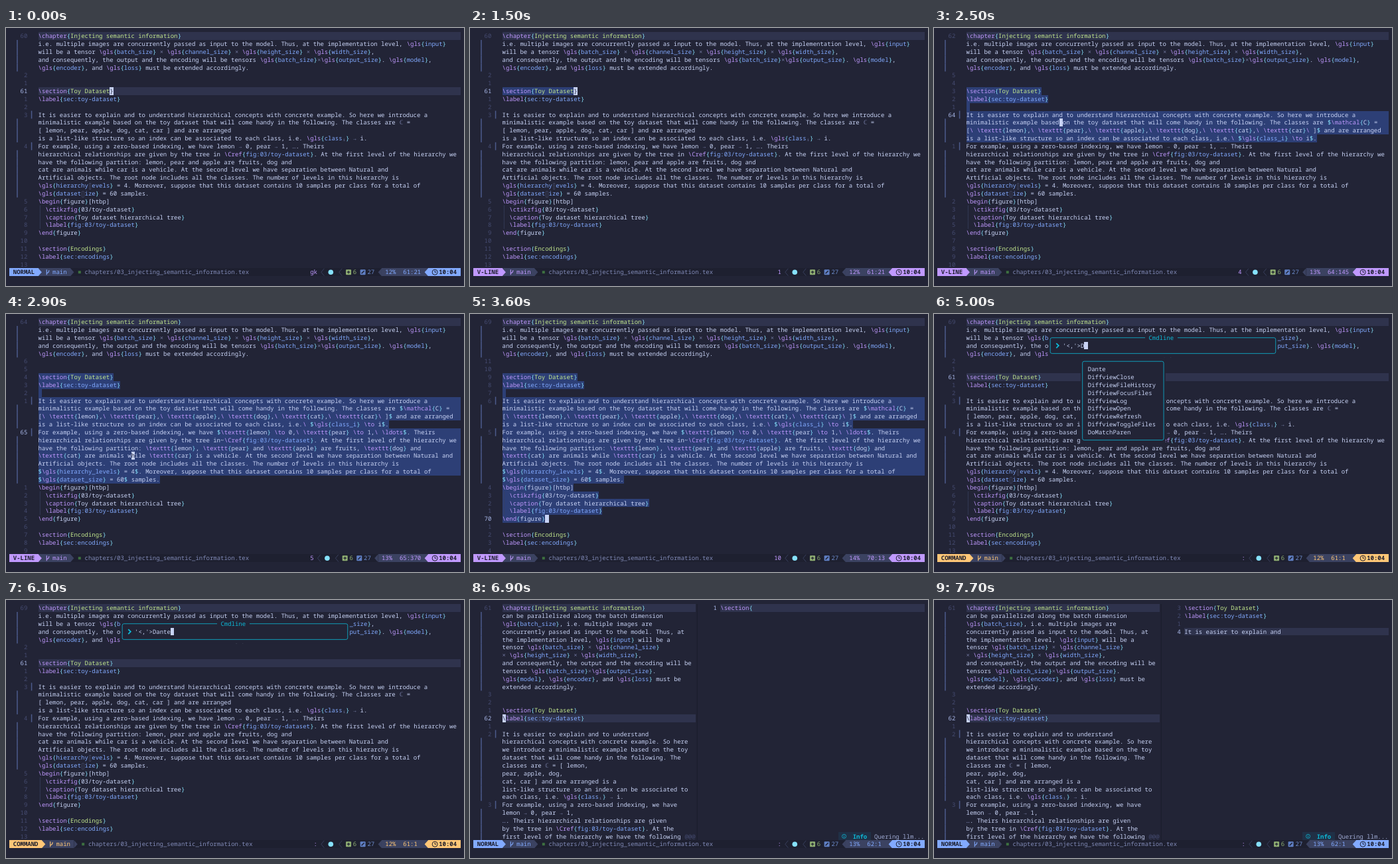
Animation, 690 px wide and 388 px high, one loop 8 s. Source, as an HTML page:

```html
<!DOCTYPE html>
<html lang="en">
<head>
<meta charset="utf-8">
<title>Editor session</title>
<style>
  html, body { margin: 0; width: 100%; height: 100%; overflow: hidden; background: #222436; }
  svg { display: block; width: 690px; height: 388px; }
  text {
    font: 8.983px "Noto Sans Mono", "DejaVu Sans Mono", monospace;
    white-space: pre;
    text-rendering: geometricPrecision;
    font-variant-ligatures: none;
  }
  .b { font-weight: 700; }
</style>
</head>
<body>
<svg id="screen" viewBox="0 0 690 388"></svg>
<script>
const W = 5.39, H = 11.84, TOP = 6.1, LOOP = 8000, TEXT = 9, EDGE = 684.5;
const C = {
  bg: '#222436', bar: '#1e2030', line: '#2f334d', panel: '#3b4261', visual: '#2d3f76',
  fg: '#c8d3f5', dim: '#737aa2', num: '#454b70', cur: '#a9b8e8', sign: '#4d5b8c',
  purple: '#c099ff', blue: '#82aaff', cyan: '#86e1fc', green: '#c3e88d',
  yellow: '#ffc777', info: '#0db9d7', file: '#828bb8'
};

const wide = String.raw`\chapter{Injecting semantic information}
i.e. multiple images are concurrently passed as input to the model. Thus, at the implementation level, \gls{input}
will be a tensor \gls{batch_size} × \gls{channel_size} × \gls{height_size} × \gls{width_size},
and consequently, the output and the encoding will be tensors \gls{batch_size}×\gls{output_size}. \gls{model},
\gls{encoder}, and \gls{loss} must be extended accordingly.


\section{Toy Dataset}
\label{sec:toy-dataset}

It is easier to explain and to understand hierarchical concepts with concrete example. So here we introduce a
minimalistic example based on the toy dataset that will come handy in the following. The classes are ℂ =
[ lemon, pear, apple, dog, cat, car ] and are arranged
is a list-like structure so an index can be associated to each class, i.e. \gls{classᵢ} → i.
For example, using a zero-based indexing, we have lemon → 0, pear → 1, …. Theirs
hierarchical relationships are given by the tree in \Cref{fig:03/toy-dataset}. At the first level of the hierarchy we
have the following partition: lemon, pear and apple are fruits, dog and
cat are animals while car is a vehicle. At the second level we have separation between Natural and
Artificial objects. The root node includes all the classes. The number of levels in this hierarchy is
\gls{hierarchy▯evels} = 4. Moreover, suppose that this dataset contains 10 samples per class for a total of
\gls{dataset▯ize} = 60 samples.
\begin{figure}[htbp]
  \ctikzfig{03/toy-dataset}
  \caption{Toy dataset hierarchical tree}
  \label{fig:03/toy-dataset}
\end{figure}

\section{Encodings}
\label{sec:encodings}
`.split('\n');

// Unconcealed text of rows 11 to 20
const raw = String.raw`minimalistic example based on the toy dataset that will come handy in the following. The classes are $\mathcal{C} =
[\ \texttt{lemon},\ \texttt{pear},\ \texttt{apple},\ \texttt{dog},\ \texttt{cat},\ \texttt{car}\ ]$ and are arranged
is a list-like structure so an index can be associated to each class, i.e.\ $\gls{class_i} \to i$.
For example, using a zero-based indexing, we have $\texttt{lemon} \to 0,\ \texttt{pear} \to 1,\ \ldots$. Theirs
hierarchical relationships are given by the tree in~\Cref{fig:03/toy-dataset}. At the first level of the hierarchy we
have the following partition: \texttt{lemon}, \texttt{pear} and \texttt{apple} are fruits, \texttt{dog} and
\texttt{cat} are animals while \texttt{car} is a vehicle. At the second level we have separation between Natural and
Artificial objects. The root node includes all the classes. The number of levels in this hierarchy is
$\gls{hierarchy_levels} = 4$. Moreover, suppose that this dataset contains 10 samples per class for a total of
$\gls{dataset_size} = 60$ samples.`.split('\n');

const narrow = String.raw`\chapter{Injecting semantic information}
can be parallelized along the batch dimension
\gls{batch_size}, i.e. multiple images are
concurrently passed as input to the model. Thus, at
the implementation level, \gls{input} will be a
tensor \gls{batch_size} × \gls{channel_size}
× \gls{height_size} × \gls{width_size},
and consequently, the output and the encoding will be
tensors \gls{batch_size}×\gls{output_size}.
\gls{model}, \gls{encoder}, and \gls{loss} must be
extended accordingly.


\section{Toy Dataset}
\label{sec:toy-dataset}

It is easier to explain and to understand
hierarchical concepts with concrete example. So here
we introduce a minimalistic example based on the toy
dataset that will come handy in the following. The
classes are ℂ = [ lemon,
pear, apple, dog,
cat, car ] and are arranged is a
list-like structure so an index can be associated to
each class, i.e. \gls{classᵢ} → i.
For example, using a zero-based indexing, we have
lemon → 0, pear → 1,
…. Theirs hierarchical relationships are given
by the tree in \Cref{fig:03/toy-dataset}. At the
first level of the hierarchy we have the following`.split('\n');

// Buffer line number for a row; 0 where a line wraps
const wideLine = r => r < 5 ? 0 : r < 11 ? r + 54 : r === 14 ? 65 : r > 20 ? r + 45 : 0;
const narrowLine = r => r < 11 ? 0 : r < 17 ? r + 48 : r === 25 ? 65 : 0;
const lastRow = n => n < 64 ? n - 54 : n === 64 ? 13 : n === 65 ? 20 : n - 45;

// time, line, row, column, position, header number
const moves = [
  [1400, 61, 7, 20, '61:21', 60], [2300, 62, 8, 20, '62:21', 60], [2400, 63, 9, 0, '63:1', 61],
  [2500, 64, 11, 26, '64:145', 62], [2600, 64, 12, 26, '64:260', 63], [2700, 65, 14, 26, '65:27', 63],
  [2800, 65, 16, 26, '65:260', 64], [2900, 65, 17, 26, '65:370', 64], [3000, 65, 19, 26, '65:590', 64],
  [3100, 66, 21, 20, '66:21', 65], [3300, 67, 22, 20, '67:21', 66], [3400, 68, 23, 20, '68:21', 67],
  [3500, 69, 24, 20, '69:21', 68], [3600, 70, 25, 12, '70:13', 69]
];
const typed = [[4000, ''], [4100, "'<,'>"], [4900, "'<,'>D"], [5400, "'<,'>Dant"], [5700, "'<,'>Dante"]];
const streamed = [
  [6200, ''], [6900, '\\section{'], [7100, '\\section{Toy Dataset}'],
  [7200, '\\section{Toy Dataset}\n\\label{sec:'],
  [7400, '\\section{Toy Dataset}\n\\label{sec:toy-dataset}\n'],
  [7500, '\\section{Toy Dataset}\n\\label{sec:toy-dataset}\n\nIt is'],
  [7600, '\\section{Toy Dataset}\n\\label{sec:toy-dataset}\n\nIt is easier to'],
  [7700, '\\section{Toy Dataset}\n\\label{sec:toy-dataset}\n\nIt is easier to explain and']
];
const matches = ['Dante', 'DiffviewClose', 'DiffviewFileHistory', 'DiffviewFocusFiles', 'DiffviewLog',
  'DiffviewOpen', 'DiffviewRefresh', 'DiffviewToggleFiles', 'DoMatchParen'];
const at = (list, t) => list.filter(e => e[0] <= t).pop();

let out = '';
const X = c => c * W, Y = r => TOP + r * H;
const esc = s => s.replace(/&/g, '&amp;').replace(/</g, '&lt;').replace(/>/g, '&gt;');

function put(c, r, s, color = C.fg, cls = '') {
  if (s.trim()) out += `<text x="${X(c).toFixed(2)}" y="${(Y(r) + 9.1).toFixed(2)}" fill="${color}" class="${cls}">${esc(s)}</text>`;
}
function rect(x, y, w, h, color, more = '') {
  out += `<rect x="${x}" y="${y}" width="${w}" height="${h}" fill="${color}" ${more}/>`;
}
function fill(x1, x2, r, color) {
  rect(x1, Y(r), x2 - x1, H, color, 'shape-rendering="crispEdges"');
}
function path(d, color, width = 1, inside = 'none') {
  out += `<path d="${d}" fill="${inside}" stroke="${color}" stroke-width="${width}"/>`;
}
function cursor(c, r, ch = '') {
  fill(X(c), X(c + 1), r, C.fg);
  put(c, r, ch, C.bg);
}
function frame(c1, r1, c2, r2) {
  const x = X(c1 + .5), y = Y(r1 + .5);
  rect(X(c1), Y(r1), X(c2 + 1 - c1), (r2 - r1 + 1) * H, C.bg);
  rect(x, y, X(c2 - c1), (r2 - r1) * H, 'none', `rx="2.5" stroke="${C.info}" stroke-width=".8"`);
}

// TeX highlighting, one positioned run per token
function tex(c, r, s) {
  let arg = C.fg, next = C.fg, m;
  const re = /\\[a-zA-Z]+|\\ |[{}$]|[^\x00-\x7f]|[^\\{}$\u0080-\uffff]+/g;
  while (m = re.exec(s)) {
    const k = m[0];
    let color = arg;
    if (k[0] === '\\') {
      color = C.purple;
      next = /section|chapter/.test(k) ? C.green : /label|gls|Cref/.test(k) ? C.blue : C.fg;
    } else if (k === '{') { color = C.cyan; arg = next; }
    else if (k === '}') { color = C.cyan; arg = C.fg; }
    else if (k === '$') color = C.cyan;
    else if (k > '\x7f') color = C.dim;
    put(c + m.index, r, k, color);
  }
}

function gutter(lineOf, cur, rows) {
  for (let r = 1; r < 30; r++) {
    const n = lineOf(r);
    if (n) {
      const s = String(n === cur ? n : Math.abs(n - cur));
      put(6 - s.length, r, s, n === cur ? C.cur : C.num);
    }
    if (rows.bars.some(([a, b]) => r >= a && r <= b)) rect(16.2, Y(r), 1.5, H + .1, C.sign);
    if (rows.marks.includes(r)) rect(37.8, Y(r), 1.5, H, C.sign);
  }
}

function arrow(c, color, dir) {
  const a = X(dir > 0 ? c : c + 1), b = X(dir > 0 ? c + 1 : c), y = Y(30);
  out += `<path d="M${a} ${y}L${b} ${y + H / 2}L${a} ${y + H}Z" fill="${color}"/>`;
}

function status(s) {
  const r = 30, y = Y(r), mid = y + H / 2;
  fill(5.4, EDGE, r, C.bar);
  // left sections
  const e = s.mode.length + 3;
  fill(X(e), X(e + 9), r, C.panel);
  fill(5.4, X(e), r, s.tint);
  arrow(e, s.tint, 1);
  arrow(e + 9, C.panel, 1);
  put(2, r, s.mode, '#1b1d2b', 'b');
  const bx = X(e + 2) + 2;
  path(`M${bx} ${y + 2}V${y + 10}M${bx} ${y + 7.5}Q${bx + 3.5} ${y + 7} ${bx + 3.5} ${y + 3}`, s.tint, 1.1);
  put(e + 4, r, 'main', s.tint);
  rect(X(e + 11) + 1, mid - 2, 4, 4, '#3d7040');
  put(e + 13, r, 'chapters/03_injecting_semantic_information.tex', C.file);
  // right sections
  fill(X(118), EDGE, r, s.tint);
  const d = Math.max(0, s.pos.length - 5);
  fill(X(105 - d), X(118), r, C.panel);
  arrow(104 - d, C.panel, -1);
  arrow(117, s.tint, -1);
  put(106 - d, r, s.pct, s.tint);
  put(111 - d, r, s.pos, s.tint);
  const cx = X(119) + 4.7;
  path(`M${cx - 4} ${mid}a4 4 0 1 0 8 0a4 4 0 1 0 -8 0M${cx} ${mid - 2.6}V${mid}H${cx + 2}`, '#1b1d2b', 1);
  put(121, r, '10:04', '#1b1d2b', 'b');
  put(87 - d - s.cmd.length, r, s.cmd, C.purple);
  for (const c of [88, 93]) {
    const x = X(c - d);
    path(`M${x + 5} ${y + .5}L${x + .5} ${mid}L${x + 5} ${y + H - .5}`, C.panel, .9);
  }
  out += `<circle cx="${X(90 - d) + 4.2}" cy="${mid}" r="3.8" fill="${C.cyan}"/>`;
  const px = X(95 - d);
  rect(px, mid - 4, 8, 8, '#8fae72', 'rx="1"');
  path(`M${px + 1.7} ${mid}h4.6M${px + 4} ${mid - 2.3}v4.6`, C.bar, 1.2);
  put(97 - d, r, '6', '#8fae72');
  const ex = X(99 - d);
  rect(ex, mid - 4, 8, 8, '#5f7fc4', 'rx="1"');
  path(`M${ex + 2} ${mid + 2}L${ex + 6} ${mid - 2}`, C.bar, 1.4);
  put(101 - d, r, '27', '#6d8bcb');
}

function header(num, right) {
  fill(X(TEXT), right, 0, C.line);
  put(4, 0, String(num), C.num);
  tex(TEXT, 0, wide[0]);
}

function wideView(s) {
  const end = s.sel ? lastRow(s.line) : 0;
  if (!s.sel) fill(X(TEXT), EDGE, s.row, C.line);
  header(s.head, EDGE);
  gutter(wideLine, s.line, { bars: [[1, 4], [11, 13], [15, 20]], marks: [10, 14] });
  for (let r = 1; r < 30; r++) {
    const picked = r >= 7 && r <= end;
    const str = picked && r > 10 && r < 21 ? raw[r - 11] : wide[r];
    if (picked) {
      const wraps = r > 9 && r < 20 && r !== 13;
      fill(X(TEXT), wraps ? EDGE : X(TEXT + Math.max(1, str.length)), r, C.visual);
    }
    if (r > 21 && r < 25) rect(X(TEXT) + 2.4, Y(r), .7, H, C.panel);
    tex(TEXT, r, str);
    if (s.block && r === s.row) cursor(TEXT + s.col, r, str[s.col]);
  }
}

function cmdline(t) {
  const c = t < 4100 ? 48 : 32, str = at(typed, t)[1];
  frame(c, 2, c + 63, 4);
  fill(X(c + 27), X(c + 36), 2, C.bg);
  put(c + 28, 2, 'Cmdline', C.info);
  if (!str) return;
  const x = X(c + 2) + 1, y = Y(3.5);
  path(`M${x} ${y - 3.5}L${x + 3.5} ${y}L${x} ${y + 3.5}`, C.info, 1.8);
  put(c + 4, 3, str);
  cursor(c + 4 + str.length, 3);
  if (t >= 4900 && t < 5200) {
    frame(41, 5, 63.7, 15);
    matches.forEach((m, i) => put(43, 6 + i, m));
  }
}

function splitView(t) {
  fill(X(TEXT), X(63), 14, C.line);
  gutter(narrowLine, 62, { bars: [[1, 10], [17, 24], [26, 29]], marks: [16, 25] });
  narrow.forEach((s, r) => r && tex(TEXT, r, s));
  put(60, 29, '@@@', C.num);
  cursor(TEXT, 14, '\\');
  rect(X(63) + 2.2, TOP, 1, 30 * H, '#1b1d2b');

  const lines = at(streamed, t)[1].split('\n'), last = lines.length - 1;
  fill(X(70), EDGE, last, C.line);
  lines.forEach((s, r) => {
    put(68, r, String(r === last ? r + 1 : last - r), r === last ? C.cur : C.num);
    tex(70, r, s);
  });
  header(t < 6500 ? 69 : 61, t < 6500 ? 592 : X(63));

  if (t >= 6300) {
    fill(X(103), X(112), 29, '#203046');
    const x = X(104) + 3, y = Y(29.5);
    path(`M${x - 3} ${y}a3 3 0 1 0 6 0a3 3 0 1 0 -6 0M${x} ${y - .4}v2M${x} ${y - 1.8}v.8`, C.info, .8);
    put(107, 29, 'Info', C.info, 'b');
    put(113, 29, 'Quering llm...', '#a0abd4');
  }
}

function draw(t) {
  out = '';
  const s = { mode: 'NORMAL', tint: C.blue, cmd: 'gk', pct: '12%', pos: '61:21',
    line: 61, row: 7, col: 20, head: 60, block: true };
  if (t >= 6200) {
    Object.assign(s, { cmd: ':', pct: '13%', pos: '62:1' });
    splitView(t);
  } else {
    if (t >= 4000) {
      Object.assign(s, { mode: 'COMMAND', tint: C.yellow, cmd: ':', pos: '61:1', col: 0, head: 69, block: t < 4100 });
    } else if (t >= 1400) {
      const [, line, row, col, pos, head] = at(moves, t);
      Object.assign(s, { mode: 'V-LINE', tint: C.purple, sel: true, line, row, col, pos, head,
        cmd: String(line - 60), pct: line < 63 ? '12%' : line < 67 ? '13%' : '14%' });
    }
    wideView(s);
    if (t >= 4000) cmdline(t);
  }
  status(s);
  document.getElementById('screen').innerHTML = out;
}

let start = null, shown = -1;
function tick(now) {
  if (start === null) start = now;
  const step = Math.floor((now - start) % LOOP / 100);
  if (step !== shown) draw((shown = step) * 100);
  requestAnimationFrame(tick);
}
draw(0);
requestAnimationFrame(tick);
</script>
</body>
</html>
```
